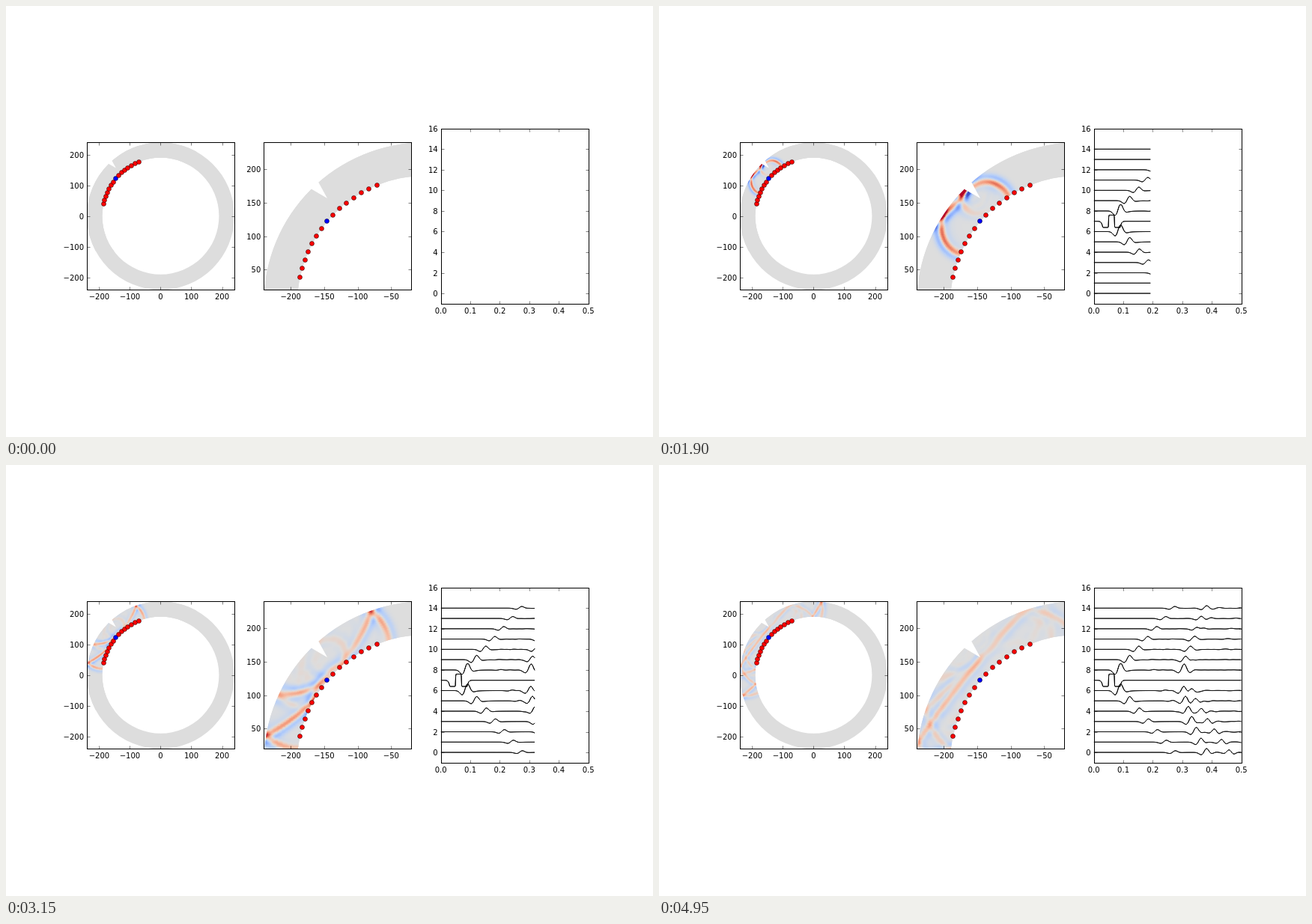
An HTML page with a canvas for the animation above (5000 ms loop, 864 by 576 pixels).

```html
<!DOCTYPE html>
<html lang="en">
<head>
<meta charset="utf-8">
<title>Wave in a notched ring</title>
<style>
  html, body { margin: 0; width: 100%; height: 100%; overflow: hidden; background: #fff; }
  canvas { display: block; }
</style>
</head>
<body>
<canvas id="stage" width="864" height="576"></canvas>
<script>
const ctx = document.getElementById('stage').getContext('2d');

const FRAMES = 100, FRAME_MS = 50, SUBSTEPS = 4, DURATION = 0.5;
const DT = DURATION / (FRAMES - 1) / SUBSTEPS;
const INNER = 190, OUTER = 240;
const RADIAL_SPEED = 412, ANGULAR_SPEED = 440 / INNER, WALL_LOSS = 0.15;
const COLOR_LIMIT = 0.5, TRACE_LIMIT = 0.6, SOURCE = 7;
const NOTCH = [[-170, 171.1], [-145.4, 156.5], [-158.3, 180]];

// Polar grid over the part of the ring the wave can reach
const ROWS = OUTER - INNER, COLS = 600, D_ANGLE = 1 / 215, FIRST_ANGLE = 1.05;

// Image of that part, one pixel per unit
const X0 = -244, TOP = 244, W = 360, H = 360;

const sensors = Array.from({ length: 15 }, (_, i) => (168.2 - 4.02 * i) * Math.PI / 180);
const onRing = (angle, r) => [r * Math.cos(angle), r * Math.sin(angle)];

// Notch widened outwards so that it cuts cleanly through the rim
const wedge = NOTCH.map(([x, y]) => [
  NOTCH[1][0] + (x - NOTCH[1][0]) * 1.2,
  NOTCH[1][1] + (y - NOTCH[1][1]) * 1.2
]);

function inWedge(x, y) {
  const sides = wedge.map(([ax, ay], i) => {
    const [bx, by] = wedge[(i + 1) % 3];
    return (bx - ax) * (y - ay) - (by - ay) * (x - ax);
  });
  return sides.every(s => s >= 0) || sides.every(s => s <= 0);
}

function ricker(t) {
  const a = (70.7 * t) ** 2;
  return (1 - 2 * a) * Math.exp(-a);
}

function simulate() {
  const n = ROWS * COLS, near = new Int32Array(4 * n);
  const isSolid = (row, col) => row >= 0 && row < ROWS && col >= 0 && col < COLS &&
    !inWedge(...onRing(FIRST_ANGLE + (col + 0.5) * D_ANGLE, INNER + row + 0.5));
  const solid = Array.from({ length: n }, (_, c) => isSolid(Math.floor(c / COLS), c % COLS));
  // A missing neighbour mirrors the cell itself: a free, reflecting wall
  for (let c = 0; c < n; c++) {
    const row = Math.floor(c / COLS), col = c % COLS;
    [[1, 0], [-1, 0], [0, 1], [0, -1]].forEach(([dr, dc], d) => {
      const r = row + dr, q = col + dc;
      const open = r >= 0 && r < ROWS && q >= 0 && q < COLS && solid[r * COLS + q];
      near[4 * c + d] = open ? r * COLS + q : c;
    });
  }

  const probes = sensors.map(angle => Math.floor((angle - FIRST_ANGLE) / D_ANGLE));
  const kr = (RADIAL_SPEED * DT) ** 2, ka = (ANGULAR_SPEED * DT / D_ANGLE) ** 2;
  const loss = WALL_LOSS * RADIAL_SPEED * DT;
  const fields = [], traces = sensors.map(() => []);
  let prev = new Float32Array(n), now = new Float32Array(n);
  const steps = (FRAMES - 1) * SUBSTEPS;
  for (let s = 0; s <= steps; s++) {
    probes.forEach((p, i) => traces[i].push(now[p]));
    if (s % SUBSTEPS === 0) fields.push(now.slice());
    for (let c = 0, q = 0; c < n; c++, q += 4) {
      if (!solid[c]) continue;
      const u = now[c], damping = c < COLS ? loss : 0;
      prev[c] = 2 * u - prev[c] - damping * (u - prev[c]) +
        kr * (now[near[q]] + now[near[q + 1]] - 2 * u) +
        ka * (now[near[q + 2]] + now[near[q + 3]] - 2 * u);
    }
    prev[probes[SOURCE]] += ricker(s * DT - 0.055);
    [prev, now] = [now, prev];
  }

  const gain = 0.66 / Math.max(...traces[SOURCE + 1].slice(0, Math.round(0.13 / DT)));
  const clip = v => Math.max(-TRACE_LIMIT, Math.min(TRACE_LIMIT, v));
  return {
    solid, fields, gain,
    traces: traces.map((trace, i) => trace.map((v, s) =>
      clip(i === SOURCE ? 6 * ricker(s * DT - 0.06) : v * gain)))
  };
}

// Diverging blue - grey - red colour scale
const STOPS = [
  [59, 76, 192], [98, 130, 234], [141, 176, 254], [184, 208, 249], [221, 221, 221],
  [245, 196, 173], [244, 154, 123], [222, 96, 77], [180, 4, 38]
];
const palette = Array.from({ length: 257 }, (_, i) => {
  const p = i / 32, a = Math.min(7, Math.floor(p));
  const [r, g, b] = STOPS[a].map((v, ch) => Math.round(v + (STOPS[a + 1][ch] - v) * (p - a)));
  return (255 << 24 | b << 16 | g << 8 | r) >>> 0;
});

const wave = simulate();
const fieldCanvas = document.createElement('canvas');
fieldCanvas.width = W;
fieldCanvas.height = H;
const fieldCtx = fieldCanvas.getContext('2d');
const image = fieldCtx.createImageData(W, H);
const pixels = new Uint32Array(image.data.buffer);

// Pairs of image pixel and polar cell
const pixelCells = [];
for (let p = 0; p < W * H; p++) {
  const x = X0 + p % W + 0.5, y = TOP - Math.floor(p / W) - 0.5;
  const r = Math.hypot(x, y) - INNER;
  const col = Math.floor(((Math.atan2(y, x) + 2 * Math.PI) % (2 * Math.PI) - FIRST_ANGLE) / D_ANGLE);
  if (r < -1 || r > ROWS + 1 || col < 0 || col >= COLS) continue;
  const cell = Math.max(0, Math.min(ROWS - 1, Math.floor(r))) * COLS + col;
  if (wave.solid[cell]) pixelCells.push([p, cell]);
}

function paintField(frame) {
  const field = wave.fields[frame], scale = 128 * wave.gain / COLOR_LIMIT;
  for (const [p, cell] of pixelCells) {
    const level = Math.round(128 + field[cell] * scale);
    pixels[p] = palette[Math.max(0, Math.min(256, level))];
  }
  fieldCtx.putImageData(image, 0, 0);
}

function makeAxes(left, top, height, [xMin, xMax], [yMin, yMax], xTicks, yTicks, digits = 0) {
  const width = 196.94;
  return {
    left, top, width, height, xTicks, yTicks, digits,
    sx: width / (xMax - xMin), sy: height / (yMax - yMin),
    x: v => left + (v - xMin) * width / (xMax - xMin),
    y: v => top + (yMax - v) * height / (yMax - yMin)
  };
}

const range = (from, to, step) =>
  Array.from({ length: Math.round((to - from) / step) + 1 }, (_, i) => from + i * step);

const hundreds = range(-200, 200, 100);
const ringAxes = makeAxes(108, 182.33, 196.94, [-240, 240], [-240, 240], hundreds, hundreds);
const zoomAxes = makeAxes(344.33, 182.33, 196.94, [-240, -20], [20, 240],
  range(-200, -50, 50), range(50, 200, 50));
const traceAxes = makeAxes(580.66, 163.76, 234.08, [0, 0.5], [-1, 16],
  range(0, 0.5, 0.1), range(0, 16, 2), 1);

const snap = v => Math.round(v) + 0.5;

function line(x1, y1, x2, y2) {
  ctx.beginPath();
  ctx.moveTo(x1, y1);
  ctx.lineTo(x2, y2);
  ctx.stroke();
}

function drawFrame(ax) {
  const l = snap(ax.left), r = snap(ax.left + ax.width);
  const t = snap(ax.top), b = snap(ax.top + ax.height);
  const label = (v, digits) => v.toFixed(digits).replace('-', '\u2212');
  ctx.strokeStyle = ctx.fillStyle = '#000';
  ctx.font = '10px "DejaVu Sans", sans-serif';
  ctx.lineWidth = 0.5;
  ctx.textAlign = 'center';
  for (const v of ax.xTicks) {
    const x = snap(ax.x(v));
    line(x, b, x, b - 4);
    line(x, t, x, t + 4);
    ctx.fillText(label(v, ax.digits), ax.x(v), Math.round(ax.top + ax.height + 12.7));
  }
  ctx.textAlign = 'right';
  for (const v of ax.yTicks) {
    const y = snap(ax.y(v));
    line(l, y, l + 4, y);
    line(r, y, r - 4, y);
    ctx.fillText(label(v, 0), ax.left - 4, Math.round(ax.y(v) + 4));
  }
  ctx.lineWidth = 1;
  ctx.strokeRect(l, t, r - l, b - t);
}

function clipTo(ax) {
  ctx.save();
  ctx.beginPath();
  ctx.rect(ax.left, ax.top, ax.width, ax.height);
  ctx.clip();
}

function drawRing(ax) {
  clipTo(ax);
  ctx.save();
  ctx.beginPath();
  ctx.arc(ax.x(0), ax.y(0), OUTER * ax.sx, 0, 2 * Math.PI);
  ctx.arc(ax.x(0), ax.y(0), INNER * ax.sx, 0, 2 * Math.PI, true);
  ctx.clip();
  ctx.fillStyle = '#ddd';
  ctx.fillRect(ax.left, ax.top, ax.width, ax.height);
  ctx.drawImage(fieldCanvas, ax.x(X0), ax.y(TOP), W * ax.sx, H * ax.sy);
  ctx.restore();

  ctx.fillStyle = '#fff';
  ctx.beginPath();
  wedge.forEach(([x, y]) => ctx.lineTo(ax.x(x), ax.y(y)));
  ctx.fill();

  ctx.strokeStyle = '#000';
  ctx.lineWidth = 0.5;
  sensors.forEach((angle, i) => {
    const [x, y] = onRing(angle, INNER);
    ctx.fillStyle = i === SOURCE ? '#00f' : '#f00';
    ctx.beginPath();
    ctx.arc(Math.floor(ax.x(x)) + 0.5, Math.floor(ax.y(y)) + 0.5, 3, 0, 2 * Math.PI);
    ctx.fill();
    ctx.stroke();
  });
  ctx.restore();
  drawFrame(ax);
}

function drawTraces(ax, frame) {
  clipTo(ax);
  ctx.strokeStyle = '#000';
  ctx.lineWidth = 1;
  ctx.lineJoin = 'round';
  wave.traces.forEach((trace, i) => {
    ctx.beginPath();
    for (let s = 0; s <= frame * SUBSTEPS; s++) ctx.lineTo(ax.x(s * DT), ax.y(i + trace[s]));
    // Two passes give the dense, dark line
    ctx.stroke();
    ctx.stroke();
  });
  ctx.restore();
  drawFrame(ax);
}

let shown = -1;
function render(time) {
  const frame = Math.floor(time / FRAME_MS) % FRAMES;
  if (frame === shown) return;
  shown = frame;
  ctx.fillStyle = '#fff';
  ctx.fillRect(0, 0, 864, 576);
  paintField(frame);
  drawRing(ringAxes);
  drawRing(zoomAxes);
  drawTraces(traceAxes, frame);
}

const start = performance.now();
function tick() {
  render(performance.now() - start);
  requestAnimationFrame(tick);
}
tick();
</script>
</body>
</html>
```
